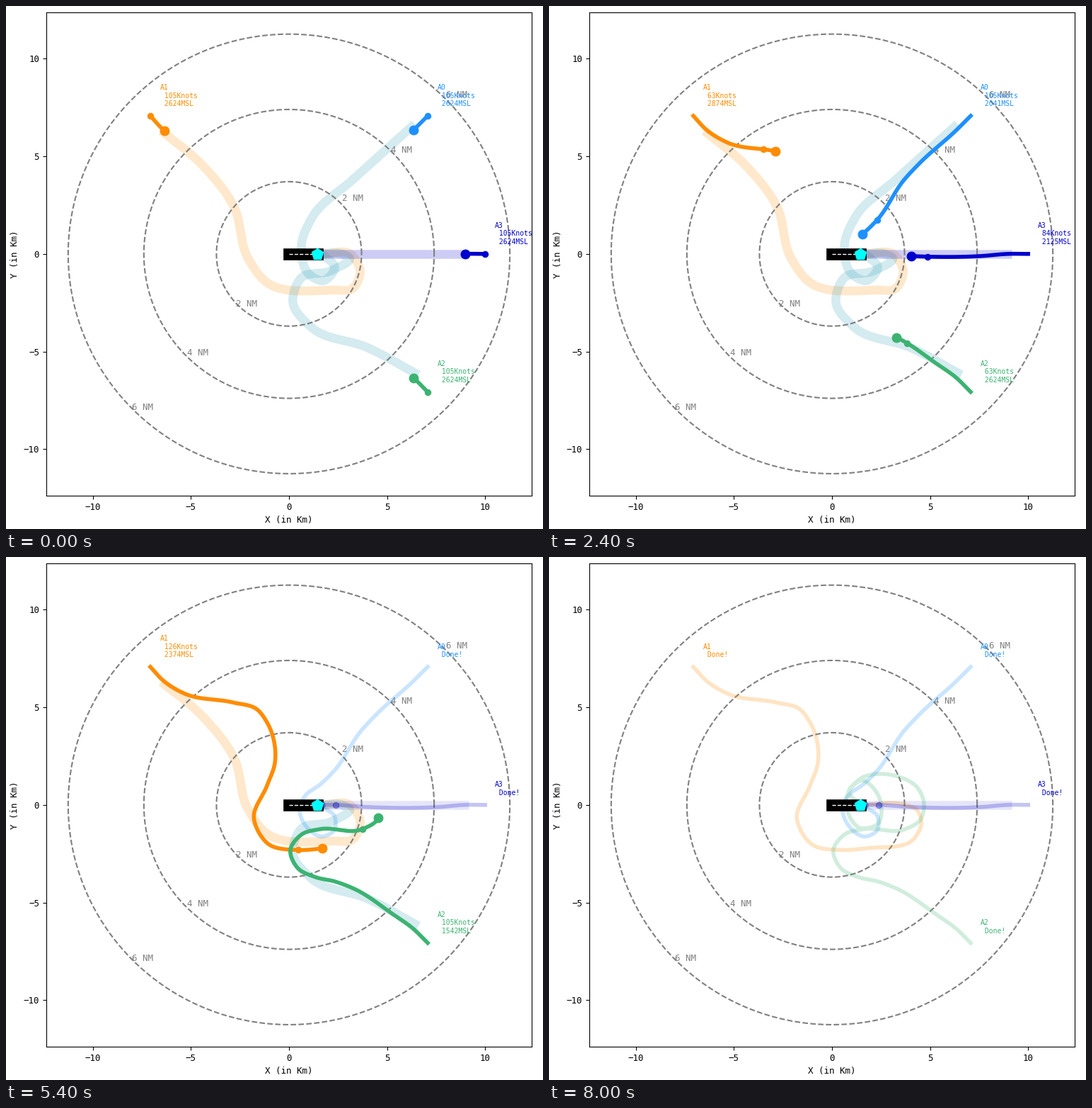
Recreate the animation shown at these times as a matplotlib script. Size 759 by 738 pixels, loop 8.1 s.

```python
import numpy as np
import matplotlib.pyplot as plt
from matplotlib.animation import FuncAnimation

W, H, DPI = 759, 738, 100
FRAMES, INTERVAL = 81, 100
LIMIT = 12.38            # half width of the map in km
KM_PER_KNOT = 0.0098     # distance flown in one move
BASE_FEET, LEVEL_FEET = 2624.2, 83.27
TOUCHDOWN = (1.45, 0)
PALE_TEAL = (0.16, 0.61, 0.71)

plt.rcParams.update({"font.family": "DejaVu Sans Mono", "font.size": 9})


def smooth(points, samples=24):
    """Hermite curve through key points, paced by the chords between them."""
    p = np.asarray(points, float)
    chord = np.hypot(*np.diff(p, axis=0).T)
    slope = np.gradient(p, np.r_[0, np.cumsum(chord)], axis=0)
    t = np.arange(samples)[None, :, None] / samples
    h = chord[:, None, None]
    a, b, u, v = (q[:, None] for q in (p[:-1], p[1:], slope[:-1], slope[1:]))
    curve = (a + (b - a) * t * t * (3 - 2 * t)
             + h * t * (1 - t) * (u * (1 - t) - v * t))
    return np.vstack([curve.reshape(-1, 2), p[-1]])


class Aircraft:
    """Flies a fixed distance per move along its track, set by its speed."""

    def __init__(self, ax, name, bearing, color, band_color, band, track, speeds,
                 levels, keep=False):
        self.name, self.levels, self.keep = name, levels, keep
        start = 10 * np.cos(np.radians(bearing)), 10 * np.sin(np.radians(bearing))
        self.curve = smooth([start, *track, TOUCHDOWN])
        self.along = np.r_[0, np.cumsum(np.hypot(*np.diff(self.curve, axis=0).T))]
        self.knots = np.repeat(*zip(*speeds))
        self.flown = np.r_[0, np.cumsum(self.knots * KM_PER_KNOT)]
        self.last = len(self.knots)

        self.band, = ax.plot(*smooth([*band, (1.7, 0)]).T, color=band_color, lw=9,
                             solid_capstyle="butt", zorder=2)
        self.trace, = ax.plot([], [], color=color, lw=4, zorder=4)
        self.tail, = ax.plot([], [], "o", color=color, ms=6, mew=0.8, zorder=4)
        self.head, = ax.plot([], [], "o", color=color, ms=9.2, mew=0.8, zorder=4)
        self.label = ax.text(start[0] + 0.5, start[1] + 0.5, "", color=color,
                             fontsize=7, zorder=6)

    def at(self, step):
        return [np.interp(self.flown[step], self.along, axis) for axis in self.curve.T]

    def show(self, step):
        landed = step == self.last
        head, tail = self.at(step), self.at(step - 1)
        passed = self.curve[self.along < self.flown[step]]
        self.trace.set_data(*np.vstack([passed, head]).T)
        self.head.set_data([head[0]], [head[1]])
        self.tail.set_data([tail[0]], [tail[1]])

        self.trace.set_alpha(0.23 if landed else 1)
        self.band.set_alpha(0.1 * self.keep if landed else 0.2)
        for dot in (self.head, self.tail):
            dot.set_alpha(0.35 * self.keep if landed else 1)

        if landed:
            status = " Done!"
        else:
            feet = BASE_FEET + LEVEL_FEET * round(np.interp(step, *zip(*self.levels)))
            status = f" {self.knots[step - 1]}Knots\n {round(feet)}MSL"
        self.label.set_text(f"{self.name}\n{status}")


def draw_map(ax):
    ax.set(xlim=(-LIMIT, LIMIT), ylim=(-LIMIT, LIMIT),
           xticks=range(-10, 11, 5), yticks=range(-10, 11, 5),
           xlabel="X (in Km)", ylabel="Y (in Km)")
    angle = np.linspace(0, 2 * np.pi, 361)
    for miles, radius, offset in ((2, 3.7, 2.7), (4, 7.4, 5.2), (6, 11.26, 8.0)):
        ax.plot(radius * np.cos(angle), radius * np.sin(angle), "--", color="gray",
                lw=1.5, zorder=3)
        for side in (1, -1):
            ax.text(side * offset, side * offset, f"{miles} NM", color="gray", zorder=3)
    ax.plot([0, TOUCHDOWN[0]], [0, 0], color="black", lw=12,
            solid_capstyle="projecting", zorder=5)
    ax.plot([0, TOUCHDOWN[0]], [0, 0], "--", color="white", lw=1, zorder=5)
    ax.plot(*TOUCHDOWN, "p", color="cyan", ms=12, zorder=6)


def plan_moves(fleet):
    """Aircraft take turns, one move per frame; landed ones are skipped."""
    steps = [1] * len(fleet)
    plan = [tuple(steps)]
    turn = 0
    while len(plan) < FRAMES:
        for _ in fleet:
            i = turn % len(fleet)
            turn += 1
            if steps[i] < fleet[i].last:
                steps[i] += 1
                break
        plan.append(tuple(steps))
    return plan


fig = plt.figure(figsize=(W / DPI, H / DPI), dpi=DPI)
ax = fig.add_axes([56.8 / W, 47.2 / H, 686.4 / W, 682 / H])
draw_map(ax)

# Bands and tracks are key points in km; speeds are (knots, moves) runs;
# levels are (move, altitude steps) pairs.
fleet = [
    Aircraft(
        ax, "A0", 45, "dodgerblue", PALE_TEAL,
        band=[(6.4, 6.65), (3.25, 3.8), (1.2, 1.9), (0.63, 0.37), (1.05, -1.07),
              (1.75, -1.37), (2.33, -0.7)],
        track=[(6.33, 6.33), (4.51, 4.69), (3.68, 3.8), (2.29, 1.73), (1.57, 1.03),
               (0.85, 0.5), (0.54, -0.1), (0.8, -1), (1.7, -1.62), (2.3, -1.3),
               (2.33, -0.61)],
        speeds=[(105, 1), (126, 5), (105, 1), (84, 8)],
        levels=[(1, 0), (4, -3), (7, -7), (13, -14)]),
    Aircraft(
        ax, "A1", 135, "darkorange", "darkorange",
        band=[(-6.5, 6.3), (-4.45, 4.58), (-2.8, 2.4), (-2.1, -0.2), (-1.25, -1.37),
              (2.3, -1.85), (3.2, -1.8), (3.63, -0.9), (3.1, 0)],
        track=[(-6.37, 6.33), (-5.3, 5.69), (-2.87, 5.25), (-1.64, 4.9), (-1.1, 4.19),
               (-0.72, 2.15), (-1.12, 0.99), (-1.79, -0.68), (-1.03, -2.02),
               (0.49, -2.31), (1.73, -2.22), (4.24, -1.66), (4.56, -0.9),
               (4.31, -0.24), (3.61, 0.03)],
        speeds=[(105, 1), (63, 7), (126, 10), (105, 2), (84, 5)],
        levels=[(1, 0), (3, 2), (7, 3), (12, -1), (17, -3), (22, -11)]),
    Aircraft(
        ax, "A2", -45, "mediumseagreen", PALE_TEAL,
        band=[(6.6, -6.2), (4, -4.8), (1.15, -3.77), (0.2, -2.5), (0.63, -1.22),
              (2.15, -0.86), (3.08, -0.2), (2.7, 0)],
        track=[(6.33, -6.34), (5.34, -5.63), (3.26, -4.27), (2.36, -3.93),
               (1.35, -3.7), (0.45, -3.24), (0.07, -2.31), (0.65, -1.51),
               (1.61, -1.24), (3.68, -1.26), (4.51, -0.75), (4.69, 0.08),
               (4.38, 0.85), (3.2, 1.5), (1.41, 1.32), (0.7, 0.2), (1.5, -1.2),
               (2.3, -1), (2.4, 0.4), (1.5, 1.25), (0.85, 0.7)],
        speeds=[(105, 1), (63, 6), (105, 9), (84, 18)],
        levels=[(1, 0), (7, 0), (12, -9), (16, -13)]),
    Aircraft(
        ax, "A3", 0, "mediumblue", "mediumblue",
        band=[(9.15, 0)],
        track=[(8.97, 0), (7.6, -0.11), (4.03, -0.11), (2.4, 0)],
        speeds=[(105, 1), (84, 9)],
        levels=[(1, 0), (3, -2), (7, -6)],
        keep=True),
]
schedule = plan_moves(fleet)


def update(frame):
    for craft, step in zip(fleet, schedule[frame]):
        craft.show(step)


anim = FuncAnimation(fig, update, frames=FRAMES, interval=INTERVAL,
                     init_func=lambda: update(0), repeat=True, repeat_delay=0)
plt.show()
```
